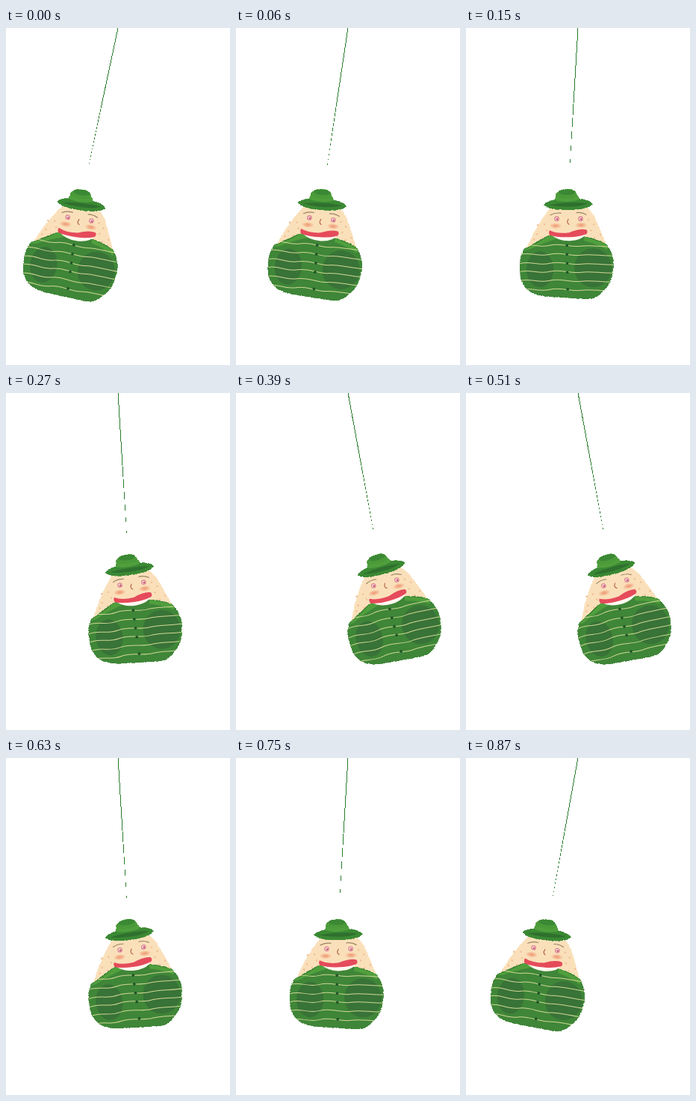
Animation of 300x450 px, one loop 0.9 s. Source, as an HTML page without scripts:

```html
<!DOCTYPE html>
<html lang="en">
<head>
<meta charset="utf-8">
<title>Swinging figure</title>
<style>
  @property --angle { syntax: "<angle>"; inherits: true; initial-value: 0deg; }
  @property --slide { syntax: "<length>"; inherits: true; initial-value: 0px; }

  html, body { margin: 0; width: 100%; height: 100%; overflow: hidden; background: #fff; }
  svg { display: block; width: 100vw; height: 100vh; }

  /* Animated properties keep the drawing repainted, so hard edges stay hard at every angle. */
  .swing {
    transform-origin: 150px 0;
    transform: rotate(var(--angle));
    animation: swing 900ms -1ms infinite steps(15);
  }
  .bob {
    transform: translateY(var(--slide));
    animation: bob 900ms -1ms infinite;
  }

  @keyframes swing {
    0%, 100% { --angle: 8.65deg; }
    50% { --angle: -17.35deg; }
  }
  /* The figure slides out along the rope, keeping its height nearly level. */
  @keyframes bob {
    0%, 100% { --slide: 5.5px; }
    0%, 50% { animation-timing-function: cubic-bezier(.5, 1, .89, 1); }
    22.2%, 77.8% { --slide: 0px; animation-timing-function: cubic-bezier(.11, 0, .5, 0); }
    50% { --slide: 6px; }
  }

  .crisp { shape-rendering: crispEdges; }
  .rough { stroke-width: .8; stroke-dasharray: 4 2 1 3 6 2 2 1; }
  .skin { fill: #fae0ba; stroke: #fae0ba; }
  .coat { fill: #3f8638; stroke: #3f8638; }
  .light { fill: #509f3d; }
  .felt { fill: #3b8934; stroke: #3b8934; }
  .crown { fill: #4b9a3a; stroke: #4b9a3a; }
  .dark { fill: #387337; }
  .line { fill: none; stroke-linecap: round; }
</style>
</head>
<body>
<svg viewBox="0 0 300 450">
  <defs>
    <path id="torso" d="M78 295C90 289 102 280 113 276L162 279C174 282 186 286 189 290C194 297 198 307 197.500 317C196 332 193 344 184 350C178 358 172 361.500 163 361.500C150 361.500 143 360 133 360C120 358.500 108 359 98 356.500C85 354 77 346 73.500 335C71 320 71 305 78 295Z"/>
    <clipPath id="inside"><use href="#torso"/></clipPath>
    <path id="stripe" d="M70 1Q78-2 91 0T112 0T134 0T154 1T177 1T200 2"/>
    <g id="eye">
      <circle r="2.700" fill="#fdeee6" stroke="#dc8494" stroke-width="1.300"/>
      <circle cx=".5" cy=".5" r="1.400" fill="#c4607a"/>
    </g>
    <radialGradient id="blush">
      <stop offset=".2" stop-color="#f0a27c"/>
      <stop offset="1" stop-color="#f0a27c" stop-opacity="0"/>
    </radialGradient>
  </defs>

  <g class="swing">
    <path class="crisp" fill="#2a7d2c" d="M149.500 0L144 92L138.800 187L139 187L145 92L150.500 0Z"/>

    <g class="bob">
      <path class="skin rough crisp" d="M112 241L163 240L171 250L178 266L188 290L160 300L110 300L80 296L91 273L102 255Z"/>
      <path class="line" stroke="#f0c299" stroke-width="2.600" d="M96 263h.1M105 262h.1M95 275h.1M108 270h.1M91 282h.1M102 280h.1M164 256h.1M171 262h.1M167 270h.1M180 276h.1M172 280h.1"/>

      <use href="#torso" class="coat rough crisp"/>
      <g clip-path="url(#inside)">
        <path class="light" d="M75 297Q100 286 113 275L126 280Q104 286 84 296ZM158 278L190 289L189 296Q176 288 158 284Z"/>
        <ellipse class="dark" cx="99" cy="322" rx="18" ry="24"/>
        <ellipse class="dark" cx="170" cy="320" rx="25" ry="26"/>
        <g class="line" stroke="#cfd693">
          <use href="#stripe" y="290"/>
          <use href="#stripe" y="302"/>
          <use href="#stripe" y="314"/>
          <use href="#stripe" y="325"/>
          <use href="#stripe" y="337"/>
          <use href="#stripe" y="349"/>
        </g>
      </g>
      <path class="line" stroke="#1d5527" stroke-width="3.600" d="M135 290h.2M135 302h.2M135.300 314h.2M135.500 326h.2M136 348.500h.2"/>

      <g class="line" stroke="#9b8464" stroke-width="1.200">
        <path d="M113 249.500Q119 246 127 247M148 246.500Q155 245.500 161 249"/>
        <path stroke="#b5654a" d="M137 255Q134 260 138 262"/>
      </g>
      <use href="#eye" x="121.500" y="254.500"/>
      <use href="#eye" x="153.500" y="254.500"/>
      <ellipse cx="120" cy="264" rx="8.500" ry="4" fill="url(#blush)"/>
      <ellipse cx="154" cy="263" rx="8.500" ry="4" fill="url(#blush)"/>

      <path fill="#fff9f2" d="M113 275Q123 284.500 139 284Q157 283 161.500 273Z"/>
      <path fill="#e54b5b" d="M112 270Q122 275 138 273Q152 267 161 269Q164 272 161 275Q150 279 138 279Q122 279.500 112 276.500Q110 272 112 270Z"/>

      <path class="crown rough crisp" d="M118 234L121 221Q124 216 135 215Q146 215 147.500 221L155 233Z"/>
      <ellipse class="felt" stroke="none" cx="135" cy="219" rx="10.500" ry="3.200"/>
      <path class="felt rough crisp" d="M104.500 236C106 232 115 230 121 229Q136 233 151 228C161 229 168 232 169.500 235C165 240 151 243 137 242.500C121 243 108 240.500 104.500 236Z"/>
      <path fill="#2f702e" d="M111 236Q137 231 163 234Q154 238.500 137 238.500Q119 238.500 111 236Z"/>
      <path class="light" d="M121 225Q136 230 150 224L152 229Q136 234 120 230Z"/>
    </g>
  </g>
</svg>
</body>
</html>
```
